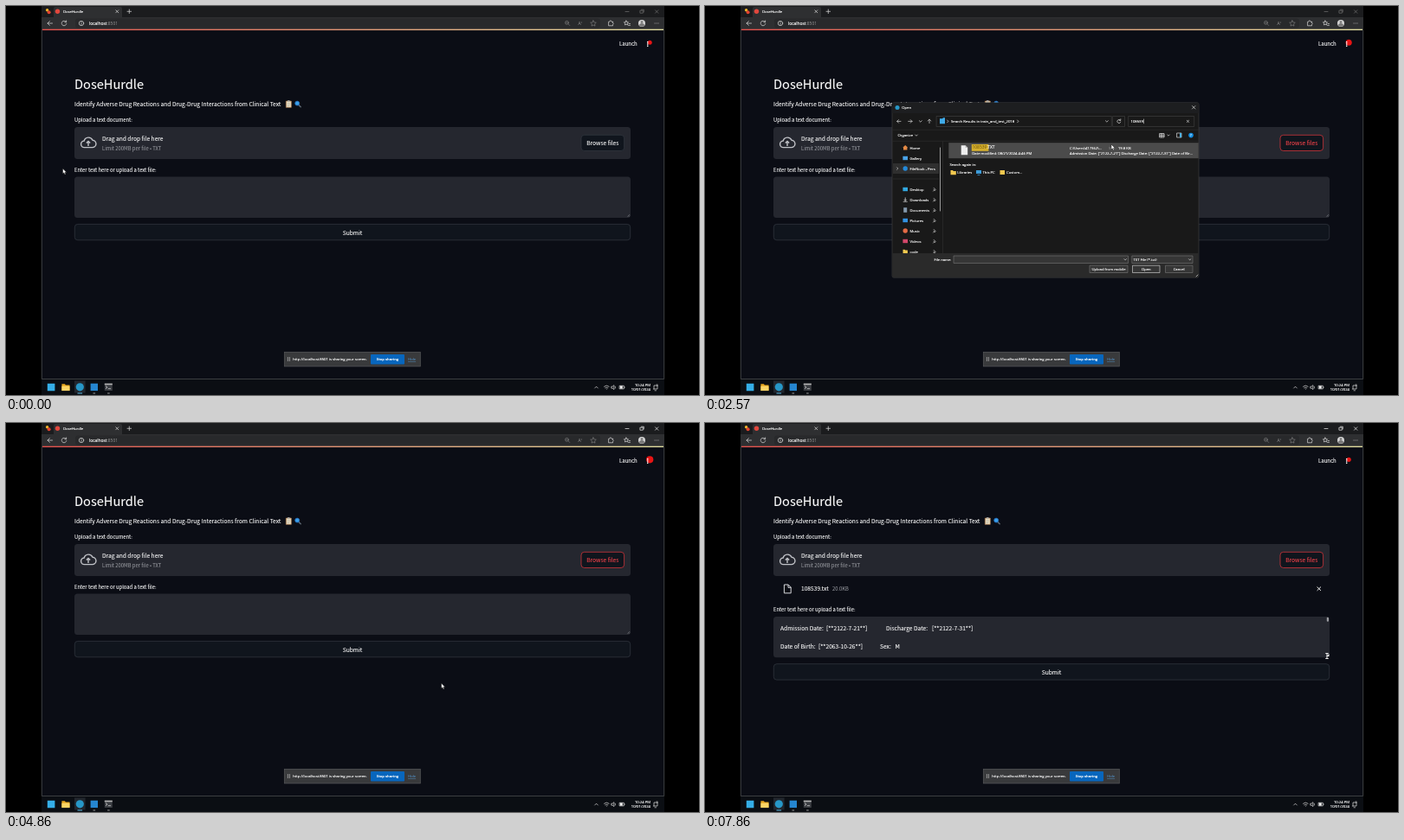
An HTML page for the animation above (8000 ms loop, 800 by 450 pixels).

```html
<!DOCTYPE html>
<html lang="en">
<head>
<meta charset="utf-8">
<title>DoseHurdle</title>
<style>
  html, body { margin: 0; width: 100%; height: 100%; overflow: hidden; background: #000; }
  svg { display: block; width: 100vw; height: 100vh; }
  text { white-space: pre; }
  .page { font-family: "Noto Sans CJK JP", "Noto Sans CJK SC", "Open Sans", sans-serif; font-size: 6.65px; fill: #fff; }
  .page text { stroke: #fff; stroke-width: .1; }
  .page .faint { fill: #a2a4aa; stroke: none; }
  .small { font-size: 5.83px; }
  .ui { font-family: "Open Sans", "Noto Sans", sans-serif; font-size: 4.2px; fill: #fff; }
  .ui text { stroke: #fff; stroke-width: .13; }
  .ui .faint { fill: #999; stroke: none; }
  .mid { text-anchor: middle; }
  .line { fill: none; stroke: #ddd; stroke-width: .7; stroke-linecap: round; stroke-linejoin: round; }
  .box { fill: #25272f; }
  .button { fill: #10151d; stroke: #343a42; stroke-width: .7; }
</style>
</head>
<body>
<svg viewBox="0 0 800 450">
  <defs>
    <linearGradient id="rainbow"><stop stop-color="#e4514c"/><stop offset="1" stop-color="#e2dfa0"/></linearGradient>
    <clipPath id="sidebarClip"><path d="M216 157h58v129h-58z"/></clipPath>
  </defs>
  <path d="M0 0h800v450H0z"/>

  <!-- Browser window -->
  <path d="M41 0h719v432H41z" fill="#1b1c1e"/>
  <path d="M55 13V3q0-2 2-2h75q2 0 2 2v10h626v14H41V13z" fill="#2e2f31"/>
  <rect x="80" y="14.5" width="606" height="11" rx="3" fill="#28292b"/>
  <circle cx="47.6" cy="4.8" r="1.7" fill="#f0b429"/>
  <circle cx="49.6" cy="7.2" r="2" fill="#e2432f"/>
  <circle cx="59.5" cy="6.3" r="2.7" fill="#e0473d"/>
  <g class="ui">
    <text x="66" y="7.9">DoseHurdle</text>
    <text x="96" y="21.7" font-size="4.9">localhost<tspan class="faint">:8501</tspan></text>
    <text class="faint" x="660.5" y="21.7" font-size="5">A<tspan dy="-1.5" font-size="3">»</tspan></text>
  </g>
  <g class="line">
    <path d="M126.8 4.8l3 3m0-3l-3 3M140 6.3h4.6M142.3 4v4.6M53.5 20H48m2.4-2.4L48 20l2.4 2.4M69.3 18.3a2.8 2.8 0 1 0 .5 2.3M69.6 16.9v1.8h-1.8"/>
    <circle cx="87" cy="20" r="2.7"/><path d="M87 19.8v1.5M87 18.5v.1"/>
    <g stroke="#858585" stroke-width=".6"><circle cx="647.5" cy="19.3" r="2"/><path d="M649 20.8l1.7 1.7M646.6 19.3h1.8"/>
      <path d="M678 16.8l1 2.1 2.3.3-1.7 1.6.4 2.3-2-1.1-2 1.1.4-2.3-1.7-1.6 2.3-.3z"/></g>
    <path d="M700.5 18.3h-1.3a1.3 1.3 0 0 0-2.6 0h-1v4.5h4.9v-1.3a1.2 1.2 0 0 0 0-2.2zM716 17l.8 1.6 1.8.2-1.3 1.3.3 1.8-1.6-.8-1.6.8.3-1.8-1.3-1.3 1.8-.2zM719 20.5h1.5M718.5 22.4h2M749 20h.1M751 20h.1M753 20h.1"/>
    <path id="controls" d="M715 6.5h4M732.3 5.2h3v3h-3zM733.5 4.2h2.8V7M749.5 4.8l3.4 3.4m0-3.4l-3.4 3.4"/>
  </g>
  <circle cx="734" cy="20" r="4" fill="#d5d5d5"/>
  <path d="M731 22.5a3 2.6 0 0 1 6 0 4 4 0 0 1-6 0" fill="#777"/><circle cx="734" cy="18.6" r="1.4" fill="#777"/>

  <!-- Web page -->
  <path d="M42 27h717v404H42z" fill="#0b0d15"/>
  <path d="M41.3 27v404.5H759.7V27" fill="none" stroke="#45474b" stroke-width=".8"/>
  <rect x="42" y="26.7" width="717" height="1.4" fill="url(#rainbow)"/>
  <g class="page">
    <text x="708" y="46.1" font-size="6">Launch</text>
    <circle id="pulse" cx="743.2" cy="42.3" fill="#e81414"/>
    <path d="M740 41h1.4v1.4H740zm0 2.3h1.4v1.4H740zm0 2.3h1.4V47H740z"/>
    <text x="79" y="95.5" font-size="14.6" font-weight="500">DoseHurdle</text>
    <text x="79" y="115.9">Identify Adverse Drug Reactions and Drug-Drug Interactions from Clinical Text</text>
    <path d="M323.3 110h6v7.3h-6z" fill="#e9dcc0" stroke="#a9764a" stroke-width=".7"/>
    <path d="M325 109.2h2.6v1.5H325z" fill="#aaa"/>
    <path d="M324.5 112.6h3.5m-3.5 1.6h3.5m-3.5 1.5h2.5" stroke="#999" stroke-width=".4"/>
    <path d="M338 114.6l2.2 2.2" stroke="#5b6670" stroke-width="1.5" stroke-linecap="round"/>
    <circle cx="336.2" cy="112.6" r="2.5" fill="#3aa0ea" stroke="#2467b5" stroke-width=".8"/>
    <text class="small" x="79" y="134.3">Upload a text document:</text>
    <rect class="box" x="79" y="140" width="642" height="37" rx="3.5"/>
    <path d="M90.6 163.6a3.8 3.8 0 0 1-.4-7.6 5.2 5.2 0 0 1 9.8-.8 4.2 4.2 0 0 1-.5 8.4zM95 162v-5.5m-2.2 2.1l2.2-2.2 2.2 2.2" fill="none" stroke="#c0c2c7" stroke-width="1.4"/>
    <text x="111" y="156.1">Drag and drop file here</text>
    <text class="small faint" x="111" y="167.3">Limit 200MB per file • TXT</text>
    <rect id="browse" class="button" x="664" y="149.3" width="49.6" height="18.2" rx="3.6"/>
    <text id="browseLabel" class="mid" x="688.8" y="160.9">Browse files</text>
    <g id="upload">
      <path d="M91.4 187h4.8l3 3v6.8h-7.8zM96 187v3.3h3.2" fill="none" stroke="#d5d6da"/>
      <text x="111" y="194.2">108539.txt</text>
      <text x="147" y="194" class="small faint">20.0KB</text>
      <path d="M706.6 189.5l4.4 4.4m0-4.4l-4.4 4.4" stroke="#eee" stroke-width="1"/>
    </g>
    <g id="form">
      <text class="small" x="79" y="192.2">Enter text here or upload a text file:</text>
      <rect class="box" x="79" y="197.6" width="642" height="47.4" rx="3.5"/>
      <path d="M717.6 243.6l2.4-2.4M719 243.7l1-1" stroke="#a5a6aa" stroke-width=".5"/>
      <rect class="button" x="79.3" y="252.4" width="641.4" height="18.4" rx="3.5"/>
      <text class="mid" x="400" y="264.5">Submit</text>
      <g id="note">
        <text x="87" y="213.4">Admission Date:</text><text x="140" y="213.4">[**2122-7-21**]</text>
        <text x="209" y="213.4">Discharge Date:</text><text x="262" y="213.4">[**2122-7-31**]</text>
        <text x="87" y="234.4">Date of Birth:</text><text x="131" y="234.4">[**2063-10-26**]</text>
        <text x="202" y="234.4">Sex:</text><text x="219.6" y="234.4">M</text>
        <path d="M720.5 240.8v3h-3z" fill="#eee"/>
      </g>
      <rect id="thumb" x="717.8" y="198.5" width="2.2" height="5" rx="1" fill="#9b9ca1"/>
    </g>
  </g>

  <!-- Screen sharing bar -->
  <rect x="321.3" y="400.3" width="157" height="16.6" fill="#393a3c" stroke="#58595b" stroke-width=".7"/>
  <path d="M325.4 406v5m2-5v5" stroke="#bbb" stroke-width=".7"/>
  <rect x="421" y="403" width="39" height="11.6" rx="1" fill="#0866bd"/>
  <g class="ui">
    <text x="331.3" y="410.2">http://localhost:8501 is sharing your screen.</text>
    <text class="mid" x="440.5" y="410.2" font-weight="600">Stop sharing</text>
    <text x="464" y="410.2" fill="#559bd6" style="stroke: none" text-decoration="underline">Hide</text>
  </g>

  <!-- Taskbar -->
  <path d="M41 432h719v18H41z" fill="#0b0e13"/>
  <path d="M47.8 436.7h8.6v8.6h-8.6z" fill="#35aee8"/>
  <path d="M64.4 437.2h3.5l1 1.3h4.6v6.6h-9.1z" fill="#e6a61f"/><path d="M64.4 439.7h9.1v5.4h-9.1z" fill="#fbd566"/>
  <path d="M79 433.5h12.6v14H79z" fill="#22272e"/>
  <circle cx="85.3" cy="440.8" r="4.6" fill="#2797c7"/>
  <path d="M97.6 436.7h8.4v8.4h-8.4z" fill="#2586d0"/>
  <path d="M113.8 436.7h9v8.3h-9z" fill="#3a3d42"/><path d="M113.8 436.7h9v1.6h-9z" fill="#b6b6b6"/>
  <path class="line" d="M115.3 439.7l1.7 1.4-1.7 1.4m2.9.2h2.5"/>
  <path d="M82.5 448h5.6" stroke="#61bfe8"/><path d="M100.5 448h2.6m14 0h2.6" stroke="#999"/>
  <path class="line" d="M679.7 442l1.8-1.8 1.8 1.8M690.5 440.2q2.8-2.5 5.6 0M691.8 441.8q1.5-1.3 3 0M693.3 443.2h.1M699.2 440.2h1l1.6-1.5v5l-1.6-1.5h-1zM703.2 440q1 1.2 0 2.4M708.5 439.3h4.8v3.6h-4.8zM714 440.6v1"/>
  <path d="M708.8 439.5h3v3.2h-3z" fill="#eee"/>
  <path class="line" d="M748 443v-4h2.5M752 440.5v2.5h-4.5M749 444.8h1.5M751 438h1.4l-1.4 1.5h1.4"/>
  <g class="ui" text-anchor="end"><text x="744" y="439.6">10:24 PM</text><text x="744" y="445.4">10/01/2024</text></g>

  <!-- File picker -->
  <g id="dialog" class="ui">
    <rect x="216" y="111.8" width="354" height="202.4" rx="2" fill="#191919" stroke="#434343" stroke-width=".6"/>
    <path d="M216.3 112.2h353.4V124H216.3z" fill="#1d1e20"/>
    <path d="M216.3 286h353.4v28H216.3z" fill="#2a2a2a"/>
    <path d="M216.3 143.2h353.4M216.3 156.3h353.4M274.5 156.3V286" stroke="#303030" stroke-width=".6"/>
    <circle cx="222" cy="117.6" r="2.5" fill="#2797c7"/>
    <text x="227.3" y="119.2">Open</text>
    <g class="line">
      <path d="M562.5 115.6l3.4 3.4m0-3.4l-3.4 3.4M226 133.4h-4.3m1.8-1.8l-1.8 1.8 1.8 1.8M234.7 133.4h4.3m-1.8-1.8l1.8 1.8-1.8 1.8M247.3 132.7l1.5 1.5 1.5-1.5M259 135.5v-4.3m-1.8 1.8l1.8-1.8 1.8 1.8"/>
      <path d="M267.5 127.5h201.8v12H267.5zM471 127.5h13.5v12H471zM489 127.5h75.7v12H489z" stroke="#444" stroke-width=".6"/>
      <path d="M279.6 132l1.3 1.4-1.3 1.4M360.6 132l1.3 1.4-1.3 1.4M462.4 132.7l1.5 1.5 1.5-1.5M479.5 132.3a2 2 0 1 0 .3 1.8M479.8 130.8v1.5h-1.5M556.3 132.2l2.3 2.3m0-2.3l-2.3 2.3M242.7 149l1.3 1.3 1.3-1.3M533.8 149l1.2 1.2 1.2-1.2"/>
      <path d="M525 147.5h5v4.5h-5zM525 149h5M525 150.5h5M527 147.5v4.5M545 147h5v5h-5z"/>
    </g>
    <path d="M548 147h2v5h-2z" fill="#4ab0ea"/><circle cx="561" cy="149.6" r="2.8" fill="#148de0"/>
    <text x="561" y="151" class="mid">?</text>
    <path d="M271 130.2h3l1-1h2v7h-6z" fill="#3faae8"/>
    <text x="284" y="134.9">Search Results in train_and_test_2018</text>
    <text id="query" x="491.5" y="134.9"></text>
    <path id="caret" d="M506.5 130.6v5.6" stroke="#fff" stroke-width=".5"/>
    <text x="222.5" y="151.1">Organize</text>
    <g id="sidebar" clip-path="url(#sidebarClip)"></g>
    <path d="M271.5 164v73" stroke="#9a9a9a" stroke-width="1" stroke-linecap="round"/>
    <g id="result">
      <rect id="row" x="281.3" y="158.2" width="288.4" height="18" stroke-width=".8"/>
      <path d="M295.7 161.2h5l2.5 2.5v8.5h-7.5z" fill="#eee"/><path d="M300.7 161.2v2.5h2.5z" fill="#aaa"/>
      <path d="M307.8 160h19.6v7.8h-19.6z" fill="#d6b02d"/>
      <text x="308.5" y="165.4" font-size="4.9"><tspan fill="#6a4f06" style="stroke: none">108539</tspan>.TXT</text>
      <text x="308.3" y="172.4">Date modified: 08/21/2024 4:46 PM</text>
      <text x="421" y="165.6">C:\Users\417362\...</text>
      <text x="466" y="165.6"><tspan class="faint">Size:</tspan>  19.8 KB</text>
      <text x="421" y="172.4">Admission Date: ["2122-7-21"] Discharge Date: ["2122-7-31"] Date of Bir...</text>
      <text x="282.5" y="185">Search again in:</text>
      <path d="M283.5 190h2.5l.8.9h3v4.3h-6.3zM340.5 190h5.5v5h-5.5z" fill="#f1c84f"/>
      <path d="M313 190h6v4h-6zM314.5 195h3v.8h-3z" fill="#3c9bd8"/>
      <text x="291.3" y="193.8">Libraries</text><text x="320.5" y="193.8">This PC</text><text x="348" y="193.8">Custom...</text>
    </g>
    <text x="264.5" y="294.8">File name:</text>
    <g fill="#363636" stroke="#777" stroke-width=".6">
      <path d="M287 289h201.5v8.5H287zM492.8 289h70.2v8.5h-70.2zM444 300.2h44v8.3h-44zM531.5 300.2h31.5v8.3h-31.5z"/>
      <path d="M493.5 300.2h31.5v8.3h-31.5z" stroke="#ddd"/>
    </g>
    <path class="line" d="M484 292.7l1.2 1.2 1.2-1.2M558.5 292.7l1.2 1.2 1.2-1.2M567 313l2-2"/>
    <text id="fileName" x="288.5" y="294.8">108539.txt</text>
    <text x="494.5" y="294.8">TXT File (*.txt)</text>
    <g class="mid"><text x="466" y="305.9">Upload from mobile</text><text x="509.3" y="305.9">Open</text><text x="547.2" y="305.9">Cancel</text></g>
  </g>

  <g id="cursor" stroke="#111" stroke-width=".5" fill="#fff">
    <path id="arrow" d="M0 0v6l1.4-1.2 1 2.2 1.1-.5-1-2.1h1.9z"/>
    <path id="hand" d="M-.7.5q.7-1 1.4 0v2.6l2.7.6q.8.3.6 1.2l-.6 3H-.5L-2.4 5q.3-.9 1.7.1z"/>
    <path id="beam" d="M-1.7-3h3.4M0-3v6M-1.7 3h3.4" fill="none" stroke="#eee" stroke-width="1"/>
  </g>
</svg>
<script>
const $ = id => document.getElementById(id);
const show = (id, on) => $(id).style.display = on ? '' : 'none';
const LOOP = 8000, STEP = 1000 / 7;
const DIALOG_OPEN = 2100, DIALOG_CLOSE = 4250, ROW_CLICK = 2820, UPLOADED = 5250;

// icon outlines, drawn around their centre
const icons = {
  house: 'M0-3l3 2.8h-.8V2.6h-4.4V-.2H-3z',
  arrow: 'M-.5-2.6h1v2.8h1.6L0 2-2.1.2h1.6zM-2.5 2.3h5v.7h-5z',
  page: 'M-2-2.8h4v5.6h-4z',
  disc: 'M-2.7 0a2.7 2.7 0 0 1 5.4 0a2.7 2.7 0 0 1-5.4 0',
  panel: 'M-2.8-2.2h5.6v4.4h-5.6z',
  folder: 'M-2.7-2.3h2l.8.8h2.6v3.8h-5.4z'
};
// label, icon, colour, row centre
const places = [
  ['Home', 'house', '#e58a45', 164], ['Gallery', 'panel', '#4aa3e8', 176], ['FileNook - Pers', 'disc', '#2489d8', 188],
  ['Desktop', 'panel', '#32a8e0', 212], ['Downloads', 'arrow', '#bbb', 224], ['Documents', 'page', '#8399ad', 236],
  ['Pictures', 'panel', '#3292e3', 248], ['Music', 'disc', '#e36b45', 260], ['Videos', 'panel', '#d3476a', 272],
  ['code', 'folder', '#f1c84f', 284]
];
$('sidebar').innerHTML = '<path d="M217 182h53v12h-53z" fill="#2f2f2f"/>' +
  '<path class="line" d="M221.6 186.8l1.2 1.2-1.2 1.2"/><path d="M217 200h53" stroke="#333" stroke-width=".6"/>' +
  places.map(([label, icon, colour, y]) =>
    `<path d="${icons[icon]}" transform="translate(231.2 ${y})" fill="${colour}"/>
     <text x="236.5" y="${y + 1.5}">${label}</text>` +
    (y > 200 ? `<path class="line" d="M264.2 ${y - 1.5}l2 2m-2.2-.3l1.5 1.5m-.7-.8l-1.2 1.2" stroke="#bbb"/>` : '')
  ).join('');

// time, x, y of the pointer tip
const path = [
  [0, 65.5, 188], [300, 65.5, 188], [1800, 672.5, 155], [2143, 672.5, 155],
  [2571, 469, 160], [2860, 469, 160], [3850, 500.5, 296], [4000, 500.5, 296],
  [4143, 502.5, 301], [5200, 502.5, 301], [6200, 632, 288.5], [6650, 632, 288.5],
  [7600, 718, 269.5], [LOOP + 1, 718, 269.5]
];
function pointerAt(t) {
  const i = path.findIndex(p => p[0] > t);
  const [t0, x0, y0] = path[i - 1], [t1, x1, y1] = path[i];
  const u = (t - t0) / (t1 - t0), e = u * u * (3 - 2 * u);
  return [x0 + (x1 - x0) * e, y0 + (y1 - y0) * e];
}

function draw(t) {
  const [x, y] = pointerAt(t);
  const inside = (l, top, r, b) => x > l && x < r && y > top && y < b;
  const dialog = t >= DIALOG_OPEN && t < DIALOG_CLOSE;
  const uploaded = t >= UPLOADED, selected = t >= ROW_CLICK;
  const shift = uploaded ? 26.3 : 0;

  const onBrowse = !dialog && inside(664, 149, 714, 168);
  const onSubmit = !dialog && inside(79, 252 + shift, 721, 271 + shift);
  const onText = !dialog && inside(79, 197 + shift, 721, 245 + shift);
  show('hand', onBrowse || onSubmit);
  show('beam', onText);
  show('arrow', !onBrowse && !onSubmit && !onText);
  $('cursor').setAttribute('transform', `translate(${x} ${y})`);

  const red = onBrowse || t >= DIALOG_OPEN;
  $('browse').style.stroke = red ? '#e5383e' : '';
  $('browseLabel').style.fill = $('browseLabel').style.stroke = red ? '#f2434a' : '';
  $('controls').style.stroke = t < DIALOG_CLOSE ? '#707070' : '#eee';
  $('pulse').setAttribute('r', 2.5 + 1.7 * Math.sin(Math.PI * t / 2000) ** 2);

  show('upload', uploaded);
  show('note', uploaded);
  show('thumb', uploaded && onText);
  $('form').setAttribute('transform', `translate(0 ${shift})`);

  show('dialog', dialog);
  const typed = Math.max(0, Math.min(6, Math.floor((t - DIALOG_OPEN) / 50)));
  $('query').textContent = '108539'.slice(0, typed);
  show('caret', typed === 6 && !selected);
  show('result', typed === 6);
  show('fileName', selected);
  $('row').style.fill = selected ? '#5c5c5c' : '#4b4b4b';
  $('row').style.stroke = selected ? '#b8b8b8' : 'none';
}

function tick() {
  const t = performance.now() % LOOP;
  draw(Math.floor(t / STEP + 0.05) * STEP % LOOP);
  requestAnimationFrame(tick);
}
tick();
</script>
</body>
</html>
```
